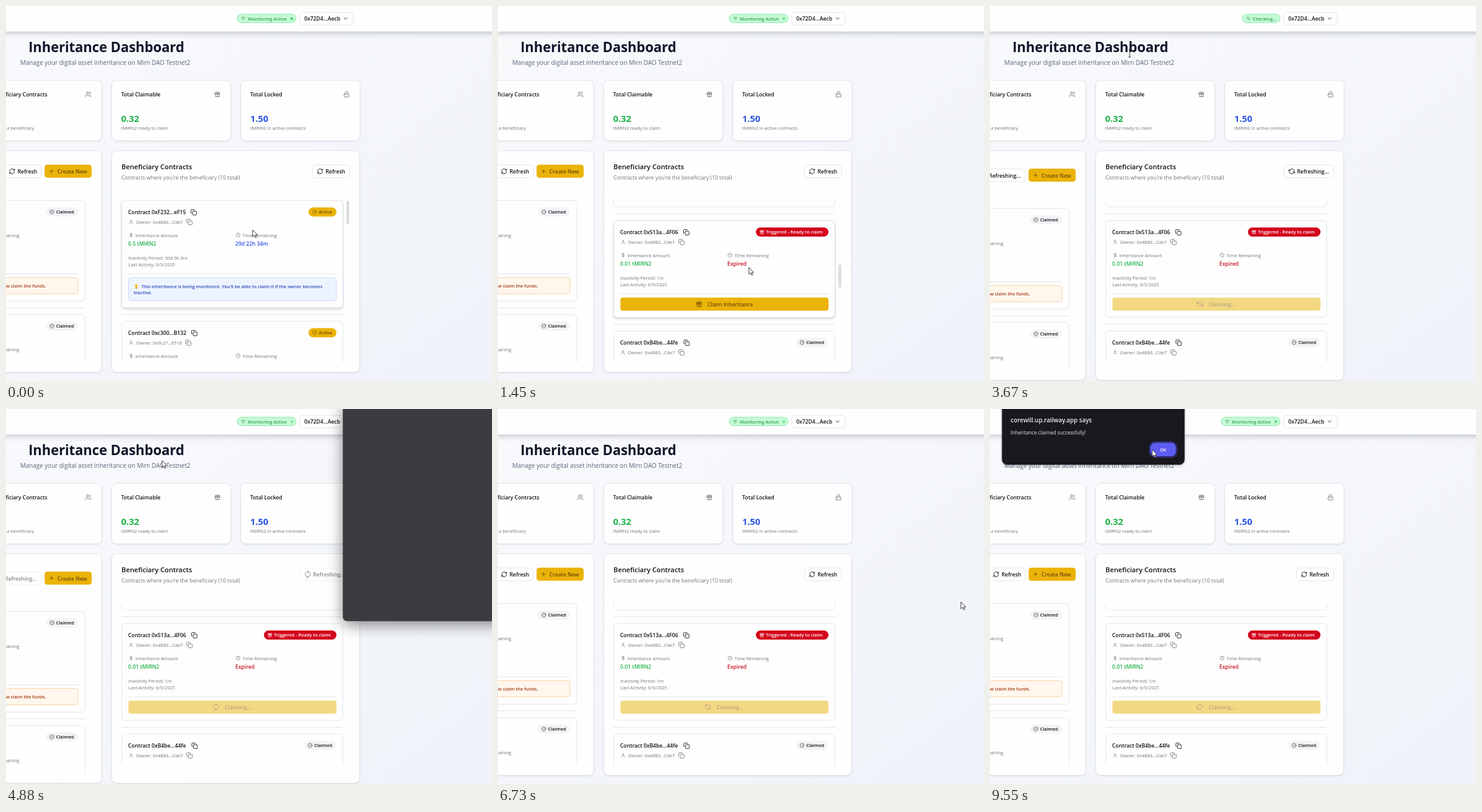
Animation, 800 px wide and 618 px high, one loop 9.58 s. Source, as an HTML page:

```html
<!DOCTYPE html>
<html lang="en">
<head>
<meta charset="utf-8">
<title>Inheritance Dashboard</title>
<style>
html, body { margin: 0; width: 100%; height: 100%; overflow: hidden; }
svg { display: block; width: 800px; height: 618px; font-family: "Open Sans", "Noto Sans", sans-serif; }
.soft { filter: drop-shadow(0 1px 1px #0f172a1c); }
.raised { filter: drop-shadow(0 2px 2px #0f172a30); }
.icon { fill: none; stroke-width: 2; stroke-linecap: round; stroke-linejoin: round; }
</style>
</head>
<body>
<svg id="stage" viewBox="0 0 800 618"></svg>
<script>
const LOOP = 9580;
const INK = '#0f1117', GRAY = '#70737c', GREEN = '#1eb34a', BLUE = '#2d55e3',
      RED = '#c20f22', GOLD = '#eab308', BROWN = '#70490f', LINE = '#e3e5ea';

const circle = (x, y, r) => `M${x - r} ${y}a${r} ${r} 0 1 0 ${2 * r} 0a${r} ${r} 0 1 0 ${-2 * r} 0`;
const ICONS = {
  copy: 'M10 8H20Q22 8 22 10V20Q22 22 20 22H10Q8 22 8 20V10Q8 8 10 8M4 16Q2 16 2 14V4Q2 2 4 2H14Q16 2 16 4',
  user: 'M19 21V19Q19 15 15 15H9Q5 15 5 19V21' + circle(12, 7, 4),
  users: 'M16 21V19Q16 15 12 15H6Q2 15 2 19V21M22 21V19Q22 16 19 15M16 3a4 4 0 0 1 0 8' + circle(9, 7, 4),
  dollar: 'M12 2V22M17 5H9.5a3.5 3.5 0 0 0 0 7h5a3.5 3.5 0 0 1 0 7H6',
  clock: circle(12, 12, 10) + 'M12 6V12L16 14',
  gift: 'M3 8H21V12H3ZM12 8V21M5 12V21H19V12M12 8Q10 3 7.5 3a2.5 2.5 0 0 0 0 5M12 8Q14 3 16.5 3a2.5 2.5 0 0 1 0 5',
  lock: 'M5 11H19Q21 11 21 13V20Q21 22 19 22H5Q3 22 3 20V13Q3 11 5 11M7 11V7a5 5 0 0 1 10 0V11',
  refresh: 'M3 12a9 9 0 0 1 15.7-6.3L21 8V3M21 8H16M21 12a9 9 0 0 1-15.7 6.3L3 16V21M3 16H8',
  check: 'M21.8 10A10 10 0 1 1 17 3.3M9 11L12 14L22 4',
  wifi: 'M12 20h.01M2 9a15 15 0 0 1 20 0M5 13a10 10 0 0 1 14 0M8.5 16.5a5 5 0 0 1 7 0',
  activity: 'M22 12H18L15 21L9 3L6 12H2',
  chevron: 'M6 9L12 15L18 9',
  plus: 'M5 12H19M12 5V19'
};

// Centred on (x, y)
const icon = (name, x, y, size, color, id = '') =>
  `<g transform="translate(${x} ${y}) scale(${size / 24})"><g ${id && `id="${id}"`}>
   <path class="icon" transform="translate(-12 -12)" d="${ICONS[name]}" stroke="${color}"/></g></g>`;
const text = (x, y, str, size, color = INK, weight = 400, anchor = 'start') =>
  `<text x="${x}" y="${y}" font-size="${size * 0.94}" fill="${color}" font-weight="${weight}"
   text-anchor="${anchor}" letter-spacing="${weight > 600 ? '-.005em' : 0}">${str}</text>`;
const box = (x, y, w, h, r, fill, stroke = 'none', cls = '') =>
  `<rect x="${x}" y="${y}" width="${w}" height="${h}" rx="${r}" fill="${fill}" stroke="${stroke}" class="${cls}"/>`;
const rule = (x1, x2, y) => `<path d="M${x1} ${y}H${x2}" stroke="${LINE}"/>`;
const group = (id, body, attrs = '') => `<g id="${id}" ${attrs}>${body}</g>`;

const claimedBadge = (right, y) => box(right - 52.5, y, 52.5, 15, 7.5, '#f3f4f6') +
  icon('check', right - 43, y + 7.4, 8, INK) + text(right - 36, y + 10.2, 'Claimed', 8, INK, 600);

const BADGES = {
  active: y => box(498, y, 46, 15, 7.5, GOLD) + icon('check', 508, y + 7.4, 8, BROWN) +
    text(515, y + 10.2, 'Active', 8, BROWN, 600),
  claimed: y => claimedBadge(543.5, y),
  triggered: y => box(424.5, y, 119.5, 15, 7.5, '#d3041b') + icon('gift', 434.5, y + 7.4, 8, '#fff') +
    text(441, y + 10.2, 'Triggered - Ready to claim', 8, '#fff', 600)
};

const FOOTERS = {
  active: y => box(201.5, y, 342, 38, 4, '#eef4ff', '#c5d8fb') +
    `<circle cx="214.5" cy="${y + 13.5}" r="2.5" fill="#f9c52b"/>` + box(213.2, y + 15.5, 2.6, 3.5, 1, '#c9a24a') +
    text(223, y + 17.2, "This inheritance is being monitored. You'll be able to claim it if the owner becomes", 8, '#2947b8', 600) +
    text(210, y + 27.8, 'inactive.', 8, '#2947b8', 600),
  claimed: y => box(201.5, y, 342, 27, 4, '#effdf4', '#bff3d0') + icon('check', 214.5, y + 14, 8, '#18783d') +
    text(220.5, y + 17, 'Inheritance has been successfully claimed!', 8, '#18783d', 600),
  triggered: (y, id) => group('idle' + id, box(201.5, y, 342.5, 21.5, 4, GOLD) + icon('gift', 331, y + 10.7, 10.7, BROWN) +
    text(345, y + 14, 'Claim Inheritance', 9.33, BROWN, 600)) +
    group('busy' + id, box(201.5, y, 342.5, 21.5, 4, GOLD) + icon('refresh', 345.5, y + 10.7, 10.7, BROWN, 'spin' + id) +
    text(360, y + 14, 'Claiming...', 9.33, BROWN, 600), 'opacity=".5" display="none"')
};
const HEIGHTS = { active: 176.5, claimed: 165.5, triggered: 159.5 };
const GAP = 22.5, LIST_TOP = 320.5;

const OWNER = '0x48B3...Cde7';
const contracts = [
  { name: '0xF232...eF15', owner: OWNER, kind: 'active', copyX: 309, amount: '0.5', left: '29d 22h 34m', period: '30d 0h 0m' },
  { name: '0xc300...B132', owner: '0x9c27...E518', kind: 'active', copyX: 310, amount: '0.5', left: '29d 22h 34m', period: '30d 0h 0m' },
  { name: '0x8Fa2...71D0', owner: OWNER, kind: 'claimed', copyX: 309 },
  { name: '0x1186...2185', owner: OWNER, kind: 'triggered', copyX: 307 },
  { name: '0x513a...4F06', owner: OWNER, kind: 'triggered', copyX: 310 },
  { name: '0xB4be...44fe', owner: OWNER, kind: 'claimed', copyX: 310.5 }
];
contracts.reduce((top, c) => (c.top = top, top + HEIGHTS[c.kind] + GAP), LIST_TOP);

function contractCard(c, i) {
  const y = c.top, h = HEIGHTS[c.kind];
  return `<rect id="card${i}" x="190.5" y="${y}" width="364" height="${h}" rx="6" fill="#fefefe" stroke="${LINE}"/>` +
    text(201, y + 22.6, 'Contract ' + c.name, 9.33, INK, 600) + icon('copy', c.copyX, y + 19.5, 10.7, INK) +
    BADGES[c.kind](y + 11.5) +
    icon('user', 206, y + 35.3, 7.5, GRAY) + text(214, y + 38.5, 'Owner: ' + c.owner, 8, GRAY) +
    icon('copy', c.owner === OWNER ? 302 : 300, y + 35.5, 10.7, GRAY) +
    icon('dollar', 206, y + 57, 8, GRAY) + text(213, y + 60, 'Inheritance Amount', 8, GRAY) +
    icon('clock', 382, y + 57, 8, GRAY) + text(389.5, y + 60, 'Time Remaining', 8, GRAY) +
    text(201, y + 74.6, (c.amount || '0.01') + ' tMIRN2', 9.33, GREEN, 600) +
    text(377.5, y + 74.6, c.left || 'Expired', 9.33, c.left ? BLUE : RED, 600) +
    text(201.5, y + 97, 'Inactivity Period: ' + (c.period || '1m'), 8, GRAY) +
    text(201.5, y + 108, 'Last Activity: 6/5/2025', 8, GRAY) +
    rule(201, 543.5, y + 121) + FOOTERS[c.kind](y + 127, i) + rule(190, 555, y + h + 11.5);
}

const ownedCard = y => box(-200, y, 330, 166, 6, '#fefefe', LINE) + claimedBadge(118.5, y + 11.5) +
  text(22, y + 60, 'Time Remaining', 8, GRAY, 400, 'end') + rule(0, 119, y + 121) +
  box(-190, y + 127, 308.5, 27, 4, '#fff6ec', '#fbd3a8') +
  text(66, y + 143.8, 'You can now claim the funds.', 8, '#a33a16', 600, 'end') + rule(0, 130, y + 177);

const stat = (x, title, iconName, note, value = '', color = '') =>
  box(x + .5, 122.5, 196, 99.5, 8, '#fefefe', LINE, 'soft') + text(x + 16, 149, title, 9.33, INK, 600) +
  icon(iconName, x + 174.5, 145.5, 10.7, GRAY) + text(x + 16, 191, value, 16, color, 700) +
  text(x + 16, 203.5, note, 8, GRAY);

const dialog = (id, message, buttons) => group(id,
  box(20, -12, 300, 103.5, 8, '#19181e', '#2d2c33', 'raised') +
  text(34, 22, 'corewill.up.railway.app says', 10.6, '#eeeef2', 600) +
  text(34, 41.5, message, 8.67, '#e4e4e9') + buttons, 'display="none"');
const okButton = x => box(x - 1.5, 54, 45, 25.5, 9, 'none', '#4243c9') +
  box(x, 55.5, 42, 22.5, 7.5, '#5c5cf0') + text(x + 21, 70, 'OK', 8, '#fff', 600, 'middle');

document.getElementById('stage').innerHTML = `
  <defs>
    <linearGradient id="page" x2="1" y2="1"><stop stop-color="#f9fafc"/><stop offset="1" stop-color="#eff2f9"/></linearGradient>
    <clipPath id="listClip"><rect x="188" y="320" width="369" height="267"/></clipPath>
    <clipPath id="ownedClip"><rect y="320" width="134" height="267"/></clipPath>
  </defs>
  <rect width="800" height="618" fill="url(#page)"/>
  <rect x="-20" y="-20" width="840" height="62" fill="#fefefe" style="filter:drop-shadow(0 3px 5px #0f172a38)"/>` +
  group('monitoring', box(380.5, 13.5, 97, 14, 7, '#c6fad6', '#8ceaac') + icon('wifi', 390.5, 20.5, 8, '#2f9e57') +
    text(398, 23.8, 'Monitoring Active', 8, '#2f9e57', 600) + '<circle id="dot" cx="470.5" cy="20.8" r="2.4" fill="#4fcf7f"/>') +
  group('checking', box(415.5, 13.5, 62, 14, 7, '#c6fad6', '#8ceaac') + icon('activity', 425.5, 20.5, 8, '#2f9e57') +
    text(432.5, 23.8, 'Checking...', 8, '#2f9e57', 600)) +
  box(483.5, 10.5, 88, 20.5, 5, '#fff', LINE) + text(491, 24, '0x72D4...Aecb', 9.33, INK, 600) + icon('chevron', 559, 20.7, 10, INK) +
  text(37, 76, 'Inheritance Dashboard', 24, '#0f172a', 700) +
  text(23.5, 97, 'Manage your digital asset inheritance on Mirn DAO Testnet2', 10.67, '#5b6678') +
  stat(-39, '', 'users', '') + text(68, 149, 'Beneficiary Contracts', 9.33, INK, 600, 'end') +
  text(46, 203.5, 'as a beneficiary', 8, GRAY, 400, 'end') +
  stat(173.5, 'Total Claimable', 'gift', 'tMIRN2 ready to claim', '0.32', GREEN) +
  stat(386, 'Total Locked', 'lock', 'tMIRN2 in active contracts', '1.50', BLUE) +
  `<rect class="panel soft" x="-250" y="238.5" width="407.5" rx="8" fill="#fefefe" stroke="${LINE}"/>
   <rect class="panel soft" x="174" y="238.5" width="408" rx="8" fill="#fefefe" stroke="${LINE}"/>` +
  group('create', box(63.5, 261.5, 77.5, 21.5, 4.5, GOLD) + icon('plus', 75, 272.3, 10, BROWN) +
    text(84.5, 276, 'Create New', 9.33, BROWN, 600)) +
  group('ready', box(-10, 262, 68, 21, 4.5, '#fff', LINE) + icon('refresh', 10, 272.5, 10.7, INK) + text(19, 276, 'Refresh', 9.33, INK, 600) +
    box(504.5, 262, 61, 21, 4.5, '#fff', LINE) + icon('refresh', 517, 272.5, 10.7, INK) + text(526, 276, 'Refresh', 9.33, INK, 600)) +
  group('refreshing', box(-30, 268.7, 88, 21, 4.5, '#fff', LINE) + text(50.5, 282.7, 'Refreshing...', 9.33, INK, 600, 'end') +
    box(484.5, 262, 81, 21, 4.5, '#fff', LINE) + icon('refresh', 496.7, 272.5, 10.7, INK, 'refreshSpin') +
    text(505.5, 276, 'Refreshing...', 9.33, INK, 600)) +
  group('owned', `<g clip-path="url(#ownedClip)">${ownedCard(LIST_TOP)}${ownedCard(508.5)}</g>`) +
  text(190, 269, 'Beneficiary Contracts', 12, INK, 600) +
  text(190, 286, "Contracts where you're the beneficiary (10 total)", 9.33, GRAY) +
  `<g clip-path="url(#listClip)">${group('list', contracts.map(contractCard).join(''))}</g>` +
  group('thumb', box(560.3, 321, 4.7, 38, 2, '#dcdcdf')) +
  group('popup', `<rect x="555" y="-12" width="265" height="361" rx="6" fill="#3c3b40" stroke="#2f2e33"
    style="filter:drop-shadow(0 6px 12px #0007)"/>`) +
  dialog('confirm', 'Are you sure you want to claim this inheritance?',
    okButton(212) + box(264, 55.5, 42, 22.5, 7.5, '#35343c') + text(285, 70, 'Cancel', 8, '#d8d8ee', 600, 'middle')) +
  dialog('success', 'Inheritance claimed successfully!', okButton(264)) +
  group('cursor', `<path id="arrow" d="M0 0V11.2L2.6 8.8L4.4 12.8L6.2 12L4.5 8.2H8Z" fill="#fff" stroke="#222" stroke-width=".9"/>
    <path id="beam" d="M-2 -6H2M0 -6V6M-2 6H2" stroke="#333" fill="none"/>`);

const $ = id => document.getElementById(id);
const show = (id, on) => $(id).setAttribute('display', on ? 'inline' : 'none');
const move = (id, x, y) => $(id).setAttribute('transform', `translate(${x} ${y})`);
const progress = (t, from, to) => Math.min(1, Math.max(0, (t - from) / (to - from)));
const ease = p => p * p * (3 - 2 * p);
const during = (t, from, to = LOOP) => t >= from && t < to;

// [start, end, x, y]: each move begins where the last one stopped
const MOVES = [
  [1130, 1400, 413, 431], [1850, 2120, 385, 488], [2330, 2620, 230, 78],
  [4750, 4880, 257, 85], [4900, 5550, 762, 318], [9080, 9450, 267, 67]
];
function cursorAt(t) {
  let x = 406, y = 369;
  for (const [from, to, toX, toY] of MOVES) {
    const p = ease(progress(t, from, to));
    x += (toX - x) * p;
    y += (toY - y) * p;
  }
  return [x, y];
}

const SCROLL_START = 30, SCROLL_END = 1112;

function render(t) {
  const scroll = 735 * progress(t, SCROLL_START, SCROLL_END);
  move('list', 0, -scroll);
  move('thumb', 0, scroll * 0.143);
  show('thumb', t < 2960);

  const refreshing = during(t, 3620, 5250), shift = refreshing ? 13 : 0;
  document.querySelectorAll('.panel').forEach(p => p.setAttribute('height', 365 + shift));
  move('owned', 0, shift);
  move('create', 0, shift / 2);
  show('ready', !refreshing);
  show('refreshing', refreshing);
  $('refreshing').setAttribute('opacity', 1 - 0.5 * progress(t, 3680, 3780));

  const checking = during(t, 3600, 4350);
  show('checking', checking);
  show('monitoring', !checking);
  $('dot').setAttribute('opacity', 0.75 + 0.25 * Math.cos(t / 1000 * Math.PI));

  const claiming = during(t, 2800);
  show('idle4', !claiming);
  show('busy4', claiming);
  const turn = `rotate(${t * 0.36 % 360})`;
  $('spin4').setAttribute('transform', turn);
  $('refreshSpin').setAttribute('transform', turn);

  const confirming = during(t, 2300, 2800);
  show('confirm', confirming);
  show('popup', during(t, 4700, 6300));
  show('success', during(t, 9050));

  const [x, y] = cursorAt(t), beam = during(t, 2800, 4750);
  move('cursor', x, y);
  show('arrow', !beam);
  show('beam', beam);
  const canHover = !confirming && !during(t, SCROLL_START, SCROLL_END) && x > 190 && x < 555 && y > LIST_TOP;
  contracts.forEach((c, i) => {
    const top = c.top - scroll;
    const hover = canHover && y > top && y < top + HEIGHTS[c.kind];
    $('card' + i).setAttribute('class', hover ? 'raised' : '');
  });
}

const start = performance.now();
(function tick() {
  render((performance.now() - start) % LOOP);
  requestAnimationFrame(tick);
})();
</script>
</body>
</html>
```
